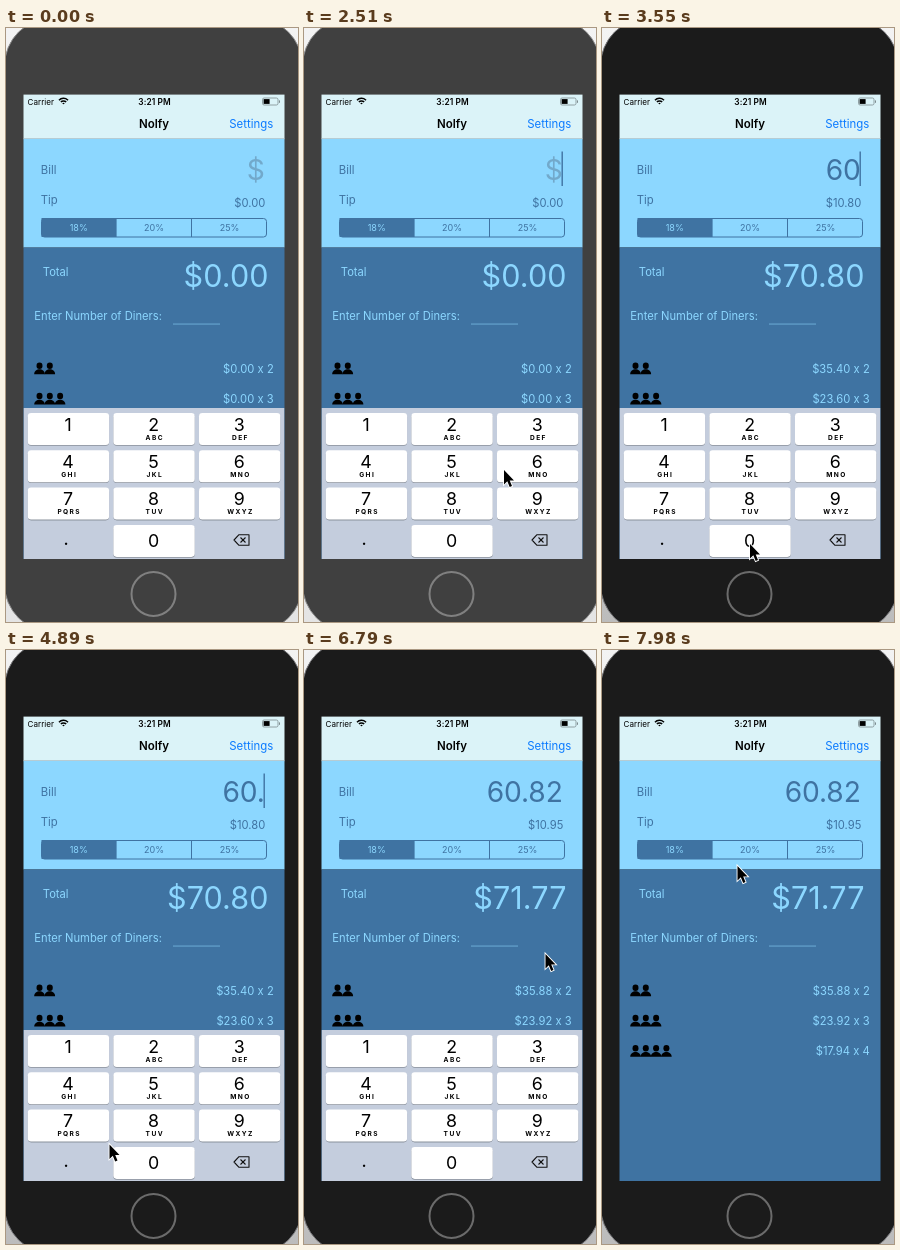
Animation of 292x594 px, one loop 8000 ms. Source, as an HTML page with a canvas:

```html
<!DOCTYPE html>
<html lang="en">
<head>
<meta charset="utf-8">
<title>Tip calculator</title>
<style>
  html, body { margin: 0; width: 100%; height: 100%; overflow: hidden; background: #f1f1f1; }
  canvas { display: block; width: 292px; height: 594px; }
</style>
</head>
<body>
<canvas id="stage"></canvas>
<script>
const W = 292, H = 594, LOOP = 8000;
const NAVY = '#3f73a2', SKY = '#8cd7ff', MINT = '#dbf3f8';
const LEFT = 17.5, TOP = 66.6, WIDE = 261, BOTTOM = 531;
const canvas = document.getElementById('stage');
const ctx = canvas.getContext('2d');
const ratio = window.devicePixelRatio || 1;
canvas.width = W * ratio;
canvas.height = H * ratio;

const BEAT = 147.6, FIRST_BEAT = 288;
const ACTIVATE = 17, DISMISS = 45, CARET_GONE = 44;
const typed = [[18, '6'], [22, '0'], [29, '.'], [35, '8'], [40, '2']];
const moves = [
  { start: 1, end: 5, to: [145, 474] },
  { start: 13, end: 15, to: [200, 442] },
  { start: 17, end: 19, to: [148, 516] },
  { start: 23, end: 27, to: [62, 515] },
  { start: 30, end: 33, to: [145, 474] },
  { start: 36, end: 39, to: [153, 392] },
  { start: 41, end: 44, to: [241.5, 304] },
  { start: 50, end: 52, to: [135.5, 216] }
];

const progress = (beat, start, end) => Math.min(1, Math.max(0, (beat - start) / (end - start)));

function pointerAt(beat) {
  let [x, y] = [310, 380];
  for (const { start, end, to } of moves) {
    const k = Math.sin(progress(beat, start, end) * Math.PI / 2);
    x += (to[0] - x) * k;
    y += (to[1] - y) * k;
  }
  return [x, y];
}

function caretShown(beat) {
  const last = typed.findLast(([when]) => when <= beat)?.[0] ?? 0;
  return beat >= 0 && beat < CARET_GONE && (beat - last) % 7 < 4;
}

function share(total, diners) {
  const each = (total / diners).toFixed(2);
  const spare = Math.floor((total - each * diners) * 100 + 1e-6);
  return `$${each} x ${diners}` + (spare > 0 ? ` (+$0.0${spare})` : '');
}

function text(str, x, y, size, color, align = 'left', weight = 400, tracking = 0) {
  ctx.font = `${weight} ${size}px Inter, "Open Sans", sans-serif`;
  ctx.letterSpacing = tracking + 'px';
  ctx.textAlign = align;
  ctx.fillStyle = color;
  ctx.fillText(str, x, y);
}

function rect(x, y, w, h, color) {
  ctx.fillStyle = color;
  ctx.fillRect(x, y, w, h);
}

function rounded(x, y, w, h, r) {
  ctx.beginPath();
  ctx.roundRect(x, y, w, h, r);
}

function polygon(points) {
  ctx.beginPath();
  points.forEach(([x, y]) => ctx.lineTo(x, y));
  ctx.closePath();
}

function drawPhone(active) {
  const backdrop = ctx.createLinearGradient(0, 0, 0, H);
  backdrop.addColorStop(0, '#f3f3f3');
  backdrop.addColorStop(1, active ? '#bcbcbc' : '#e4e4e4');
  rect(0, 0, W, H, backdrop);
  rounded(-1.5, -10, 298, 614, 48);
  ctx.fillStyle = active ? '#1b1b1b' : '#404040';
  ctx.fill();
  ctx.strokeStyle = active ? '#77777a' : '#8c8c8c';
  ctx.lineWidth = 1;
  ctx.stroke();
  ctx.beginPath();
  ctx.arc(147.5, 566, 22, 0, Math.PI * 2);
  ctx.strokeStyle = active ? '#6b6b6b' : '#808080';
  ctx.lineWidth = 2;
  ctx.stroke();
}

function drawStatus() {
  text('Carrier', 21.5, 76.5, 8.1, '#000');
  text('3:21 PM', 148.5, 76.5, 8.3, '#000', 'center', 600, 0.1);
  ctx.strokeStyle = '#000';
  ctx.lineWidth = 1.5;
  for (let r = 1; r < 7; r += 2.6) {
    ctx.beginPath();
    ctx.arc(57.5, 76.5, r, -Math.PI * 0.76, -Math.PI * 0.24);
    ctx.stroke();
  }
  rounded(256.5, 70, 15.5, 7, 1.6);
  ctx.strokeStyle = '#7d8b8f';
  ctx.lineWidth = 0.8;
  ctx.stroke();
  rect(257.6, 71.1, 6, 4.8, '#000');
  rect(273, 72.4, 1, 2.4, '#7d8b8f');
}

function drawSegments() {
  rect(35.5, 190, 74.5, 19, NAVY);
  rounded(35.5, 190.5, 225, 18.5, 3);
  ctx.strokeStyle = NAVY;
  ctx.lineWidth = 1;
  ctx.stroke();
  ['18%', '20%', '25%'].forEach((label, i) => {
    if (i) rect(34.2 + i * 75.4, 190, 1, 19, NAVY);
    text(label, 72.7 + i * 75.4, 202.8, 9, i ? NAVY : SKY, 'center');
  });
}

function drawPeople(count, y) {
  ctx.fillStyle = '#000';
  for (let i = 0; i < count; i++) {
    const x = 33.5 + i * 10.3;
    ctx.beginPath();
    ctx.ellipse(x, y - 2.8, 3, 3.3, 0, 0, Math.PI * 2);
    ctx.fill();
    ctx.beginPath();
    ctx.moveTo(x - 5.3, y + 5.7);
    ctx.bezierCurveTo(x - 5.3, y - 0.8, x + 5.3, y - 0.8, x + 5.3, y + 5.7);
    ctx.fill();
  }
}

function drawScreen(beat) {
  const bill = typed.filter(([when]) => when <= beat).map(([, key]) => key).join('');
  const tip = bill * 0.18, total = bill * 1.18;
  rect(LEFT, TOP, WIDE, 44.4, MINT);
  rect(LEFT, 110.4, WIDE, 0.8, '#9fb4bd');
  rect(LEFT, 111, WIDE, 108.5, SKY);
  rect(LEFT, 219.5, WIDE, BOTTOM - 219.5, NAVY);
  drawStatus();
  text('Nolfy', 148, 100, 11.5, '#000', 'center', 600);
  text('Settings', 267.2, 100, 11.4, '#0a7aff', 'right');

  text('Bill', 34.8, 145.7, 11.3, NAVY);
  text(bill || '$', 258.8, 151.7, 28.2, bill ? NAVY : '#72a9cb', 'right', 400, -0.1);
  if (caretShown(beat)) rect(257.5, 123.5, 1.4, 34.5, NAVY);
  text('Tip', 34.8, 176, 11.3, NAVY);
  text('$' + tip.toFixed(2), 259.3, 178.6, 11.2, NAVY, 'right');
  drawSegments();

  text('Total', 36.8, 247.8, 11.2, SKY);
  text('$' + total.toFixed(2), 262.6, 259, 30.5, SKY, 'right', 400, 0.1);
  text('Enter Number of Diners:', 28.3, 291.7, 11.2, SKY);
  rect(167, 295.6, 47, 0.9, '#70b2dc');
  for (let diners = 2; diners <= 4; diners++) {
    const y = 340.5 + (diners - 2) * 30.3;
    drawPeople(diners, y);
    text(share(total, diners), 267.8, y + 4.2, 11.2, SKY, 'right', 400, 0.05);
  }
}

function drawBackspace(x, y) {
  ctx.strokeStyle = '#111';
  ctx.lineWidth = 1.1;
  ctx.lineJoin = 'round';
  polygon([[x, y], [x + 5, y - 5.3], [x + 15, y - 5.3], [x + 15, y + 5.3], [x + 5, y + 5.3]]);
  ctx.stroke();
  for (const side of [-2.5, 2.5]) {
    ctx.beginPath();
    ctx.moveTo(x + 9 - side, y - 2.5);
    ctx.lineTo(x + 9 + side, y + 2.5);
    ctx.stroke();
  }
}

function drawKey(col, row, digit, letters) {
  const x = 21.8 + col * 85.6, y = 385 + row * 37.3, mid = x + 40.6;
  rounded(x, y + 0.8, 81.3, 32, 3.3);
  ctx.fillStyle = '#8a919c';
  ctx.fill();
  rounded(x, y, 81.3, 32, 3.3);
  ctx.fillStyle = '#fff';
  ctx.fill();
  text(digit, mid - 0.4, y + (letters === null ? 21.6 : 17.5), 17.8, '#000', 'center');
  if (letters) text(letters, mid + 0.8, y + 26.8, 6.6, '#000', 'center', 700, 1.4);
}

function drawKeyboard(beat) {
  const drop = (BOTTOM - 380) * (1 - (1 - progress(beat, DISMISS, DISMISS + 4)) ** 5);
  ctx.save();
  ctx.beginPath();
  ctx.rect(LEFT, TOP, WIDE, BOTTOM - TOP);
  ctx.clip();
  ctx.translate(0, drop);
  rect(LEFT, 380, WIDE, BOTTOM - 380, '#c4cddd');
  ['', 'ABC', 'DEF', 'GHI', 'JKL', 'MNO', 'PQRS', 'TUV', 'WXYZ'].forEach((letters, i) =>
    drawKey(i % 3, Math.floor(i / 3), String(i + 1), letters));
  drawKey(1, 3, '0', null);
  text('.', 60, 516.5, 17, '#000', 'center', 500);
  drawBackspace(228, 512);
  ctx.restore();
}

function drawPointer(x, y) {
  ctx.save();
  ctx.translate(x, y);
  polygon([[0, 0], [0, 14.4], [3.3, 11.3], [5.7, 17], [8, 16], [5.7, 10.4], [10, 10.4]]);
  ctx.lineJoin = 'miter';
  ctx.lineWidth = 1.8;
  ctx.strokeStyle = '#fff';
  ctx.stroke();
  ctx.fillStyle = '#000';
  ctx.fill();
  ctx.restore();
}

function draw(now) {
  const beat = Math.floor((now % LOOP - FIRST_BEAT) / BEAT);
  ctx.setTransform(ratio, 0, 0, ratio, 0, 0);
  drawPhone(beat >= ACTIVATE);
  drawScreen(beat);
  drawKeyboard(beat);
  drawPointer(...pointerAt(beat));
}

let start;
function tick(now) {
  start ??= now;
  draw(now - start);
  requestAnimationFrame(tick);
}
requestAnimationFrame(tick);
</script>
</body>
</html>
```
